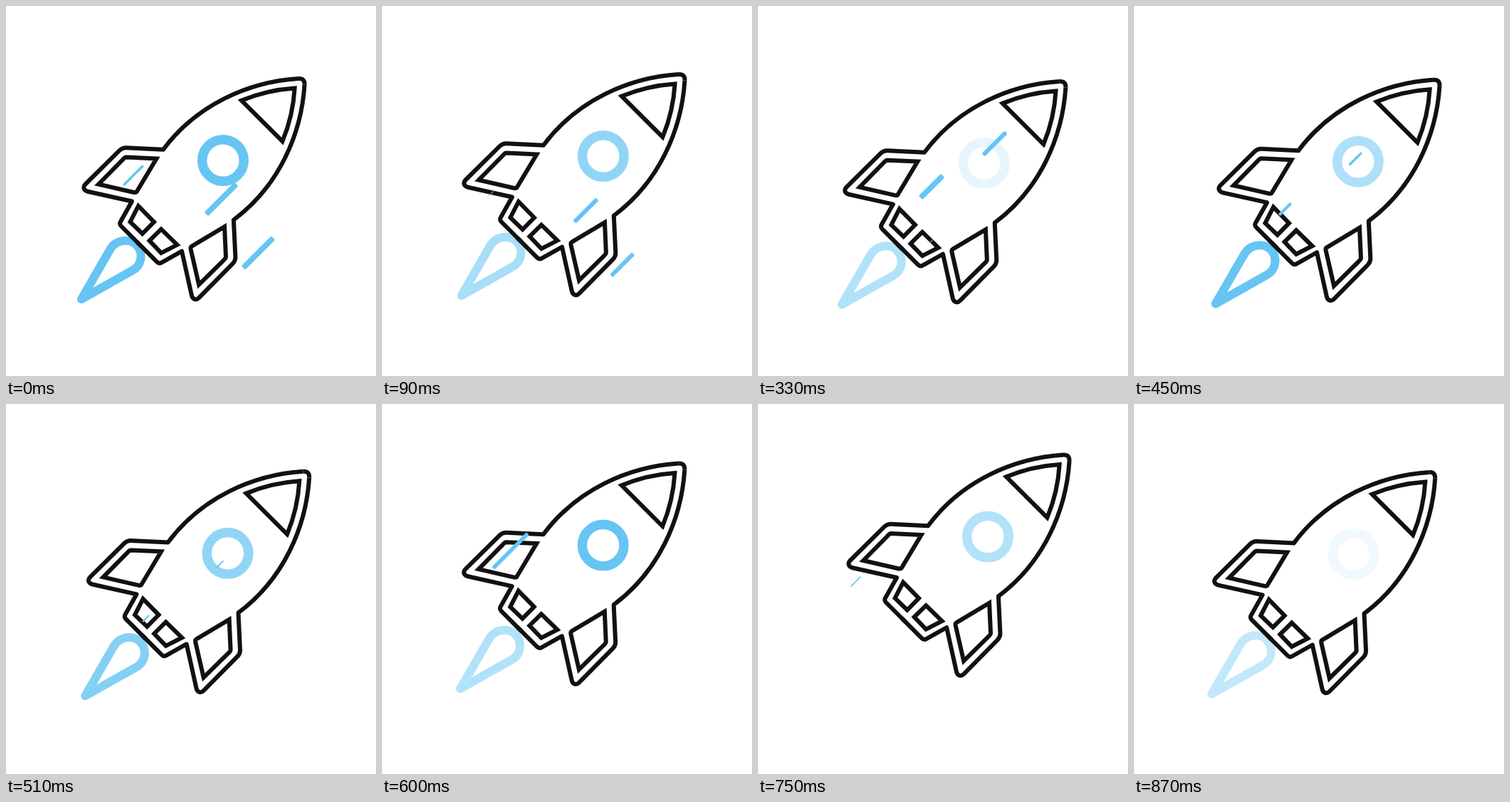
Recreate the animation shown at these times as an HTML page. Size 520x520 px, loop 0.9 s.

```html
<!DOCTYPE html>
<html lang="en">
<head>
<meta charset="utf-8">
<title>Rocket</title>
<style>
  html, body { margin: 0; width: 100%; height: 100%; overflow: hidden; background: #fff; }
  svg { display: block; width: 100%; height: 100%; }
  .ink { fill: none; stroke: #111; stroke-width: 6; }
</style>
</head>
<body>
<svg viewBox="0 0 520 520">
  <defs>
    <g id="half" class="ink">
      <path d="M411 102C341 106.500 268 138.500 221 201.700L169 199.200Q163.500 199 159.500 203L111.500 250.500C107.500 254.500 109.500 259.500 115 260.700L177 274.500L161 303Q159 306.500 162 309.500L190 337.500" stroke-linejoin="round"/>
      <path d="M169 212.600L211.500 214.500L184 260.500Q183 262.500 180 262L130 250.500L164 216Q167 212.600 169 212.600Z"/>
      <path d="M186 281L208 303.500L191.700 320L174.500 303.500Z"/>
    </g>
  </defs>
  <g id="flame">
    <path d="M106 412L147 341C153 332 163 328.800 172 330C184 332 191 343 189.500 355C188 364 183 369 177 372Z"
      fill="none" stroke="#66c5f3" stroke-width="12" stroke-linejoin="round"/>
  </g>
  <g id="rocket">
    <path d="M411 102Q420 101 419.600 110.600C415 181 383 253 320 300L248 344L212 359L163 309L177 274L221 202C268 138 341 106 411 102Z" fill="#fff"/>
    <use href="#half"/>
    <use href="#half" transform="matrix(0 -1 -1 0 521.600 521.600)"/>
    <path class="ink" d="M411 102Q420 101.500 419.600 110.600"/>
    <path class="ink" d="M331 132.800Q367 118 405.700 115.500Q403.500 154 388.500 190.200Z"/>
    <circle id="port" cx="305" cy="217" r="29.300" fill="none" stroke="#66c5f3" stroke-width="13.400"/>
  </g>
  <g id="streaks" fill="#66c5f3"></g>
</svg>
<script>
  const LOOP = 900, STEP = 30;
  const $ = id => document.getElementById(id);
  const flame = $('flame'), rocket = $('rocket'), port = $('port');

  // keys: [step, value]
  const driftX = [[0, 0], [6, 11.8], [13, 13.2], [19, 3.3], [25, 18], [30, 0]];
  const driftY = [[0, 0], [6, -12], [13, 10.5], [19, -16], [25, -30.5], [30, 0]];
  const lag = [[0, 0], [25, 1], [30, 0]];
  const flameFade = [[0, 1], [7, 0], [15, 1], [25, 0], [35, 1]];
  const portFade = [[0, 1], [10, 0.06], [20, 1], [30, 0]];

  const streaks = [
    { from: 0, to: 4, x: 179, y: 238, speed: 8.6, len: 39, w: 3.5 },
    { from: 0, to: 12.6, x: 302.5, y: 271.5, speed: 5.35, len: 60, w: 8 },
    { from: 0, to: 11.3, x: 354.5, y: 347, speed: 5.6, len: 60, w: 8 },
    { from: 7, to: 19.8, x: 354, y: 172, speed: 5.35, len: 66, w: 9 },
    { from: 8, to: 19.5, x: 267.7, y: 230.3, speed: 7.9, len: 60, w: 10.5 },
    { from: 20, to: 27, x: 180.5, y: 206.5, speed: 8.6, len: 69, w: 5.5 }
  ];
  for (const s of streaks) {
    s.el = document.createElementNS('http://www.w3.org/2000/svg', 'rect');
    s.el.setAttribute('x', -s.len / 2);
    s.el.setAttribute('y', -s.w / 2);
    s.el.setAttribute('width', s.len);
    s.el.setAttribute('height', s.w);
    s.el.setAttribute('rx', s.w * 0.35);
    $('streaks').append(s.el);
  }

  function at(keys, t) {
    let i = 1;
    while (i < keys.length - 1 && t > keys[i][0]) i++;
    const [t0, a] = keys[i - 1], [t1, b] = keys[i];
    return a + (b - a) * (t - t0) / (t1 - t0);
  }

  function draw(ms) {
    const t = Math.floor((ms % LOOP) / STEP);
    const x = at(driftX, t), y = at(driftY, t), k = at(lag, t);
    rocket.setAttribute('transform', `translate(${x} ${y})`);
    flame.setAttribute('transform', `translate(${x - 2 * k} ${y + 8 * k})`);
    flame.setAttribute('opacity', at(flameFade, t));
    port.setAttribute('opacity', at(portFade, t));
    for (const s of streaks) {
      const age = t - s.from, live = age >= 0 && t < s.to;
      s.el.setAttribute('visibility', live ? 'visible' : 'hidden');
      if (!live) continue;
      const d = s.speed * age, size = 1 - age / (s.to - s.from);
      s.el.setAttribute('transform', `translate(${s.x - d} ${s.y + d}) rotate(-45) scale(${size})`);
    }
  }

  const start = performance.now();
  function tick() {
    draw(performance.now() - start);
    requestAnimationFrame(tick);
  }
  tick();
</script>
</body>
</html>
```
